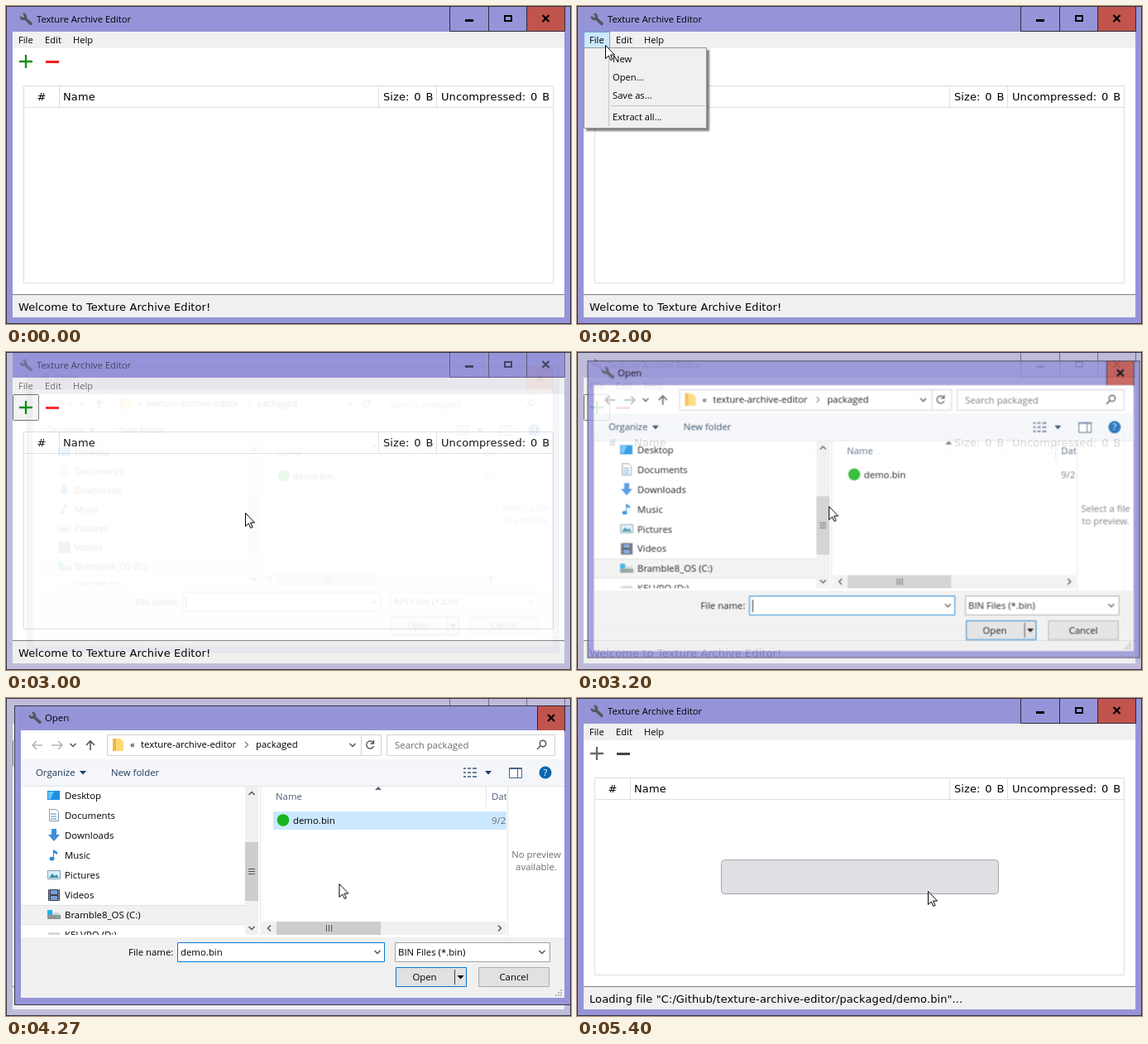
An HTML page that plays this animation: 683x384 px, repeating every 8000 ms.

```html
<!DOCTYPE html>
<html lang="en">
<head>
<meta charset="utf-8">
<title>Texture Archive Editor</title>
<style>
html, body { margin: 0; width: 100%; height: 100%; overflow: hidden; background: #fff; }
svg.stage { display: block; width: 100%; height: 100%; }
text { font: 11.2px "Open Sans", "Noto Sans", sans-serif; white-space: pre; }
.wide text { font: 13px "DejaVu Sans", sans-serif; letter-spacing: .1px; }
.head { word-spacing: 1.5px; }
.dialog text { font-size: 11.4px; }
.mid { text-anchor: middle; }
.line { fill: none; stroke-width: 1; }
.muted { fill: #6d6d6d; }

/* hard state changes share one clock; the keyframe name picks the state */
.state { animation: 8s step-end infinite; }
.border { animation-name: border; }
.titlebar { animation: titlebar 8s linear infinite; }
.red { animation-name: red; }
.dim { animation-name: dim; }
.hot-file { animation-name: hotFile; }
.menu { animation-name: menu; }
.hot-open { animation-name: hotOpen; }
.focus { animation-name: focus; }
.idle { animation-name: idle; }
.loading { animation-name: loading; }
.unpicked { animation-name: unpicked; }
.picked { animation-name: picked; }
.row { animation-name: row; }
.marked { animation-name: marked; }
.name-text { animation-name: nameText; }
.open-button { animation-name: openButton; }
.dialog-title { animation-name: dialogTitle; }
.dialog-close { animation-name: dialogClose; }
.dialog { transform-origin: 346px 189px; animation: dialog 8s linear infinite; }
.pointer { animation-name: pointer; }
.path { animation: path 8s ease-in-out infinite; }

@keyframes border { 0% { fill: #9694d8 } 33.375% { fill: #bfbcda } 59.125%, 100% { fill: #9694d8 } }
@keyframes titlebar {
  0%, 37.5% { fill: #9694d8 } 39.5%, 59.1% { fill: #bfbcda } 59.125%, 100% { fill: #9694d8 }
}
@keyframes red { 0% { opacity: 1 } 33.375% { opacity: 0 } 60%, 100% { opacity: 1 } }
@keyframes dim { 0% { opacity: 1 } 33.375% { opacity: .55 } 59.125%, 100% { opacity: 1 } }
@keyframes hotFile {
  0% { opacity: 0; fill: #e5f3ff } 21.6% { opacity: 1; fill: #e5f3ff }
  23.375% { opacity: 1; fill: #cce8ff } 30.875%, 100% { opacity: 0 }
}
@keyframes menu { 0% { opacity: 0 } 23.375% { opacity: 1 } 30.875%, 100% { opacity: 0 } }
@keyframes hotOpen { 0% { opacity: 0 } 27.4% { opacity: 1 } 30.875%, 100% { opacity: 0 } }
@keyframes focus { 0% { opacity: 0 } 30.875% { opacity: 1 } 59.125%, 100% { opacity: 0 } }
@keyframes idle { 0% { opacity: 1 } 62%, 100% { opacity: 0 } }
@keyframes loading { 0% { opacity: 0 } 62%, 100% { opacity: 1 } }
@keyframes unpicked { 0% { opacity: 1 } 49.2%, 100% { opacity: 0 } }
@keyframes picked { 0% { opacity: 0 } 49.2%, 100% { opacity: 1 } }
@keyframes row {
  0% { fill: #fff } 46.5% { fill: #e5f3ff } 49.2% { fill: #cce8ff } 58.375%, 100% { fill: #e6e6e6 }
}
@keyframes marked { 0% { opacity: 0 } 58.375%, 100% { opacity: 1 } }
@keyframes nameText { 0% { opacity: 0 } 49.2% { opacity: 1; fill: #000 } 58.375%, 100% { opacity: 1; fill: #fff } }
@keyframes openButton { 0% { fill: #e1e1e1 } 56.6% { fill: #e5f1fb } 58.375%, 100% { fill: #bfe0f8 } }
@keyframes dialogTitle { 0% { fill: #9694d8 } 59.125%, 100% { fill: #bfbcda } }
@keyframes dialogClose { 0% { fill: #c1544c } 59.125%, 100% { fill: #bfbcda } }
@keyframes dialog {
  0%, 37.49% { opacity: 0; transform: scale(.95) }
  37.5% { opacity: .09; transform: scale(.956) }
  40.5%, 59.1% { opacity: 1; transform: none }
  59.125% { opacity: .68; transform: scale(.989) }
  62%, 100% { opacity: 0; transform: scale(.95) }
}
@keyframes pointer { 0% { opacity: 0 } 12.5%, 100% { opacity: 1 } }
@keyframes path {
  0%, 12.5% { transform: translate(172px, 234px) }
  22.5%, 25% { transform: translate(34px, 47px) }
  29.125%, 30.875% { transform: translate(62px, 88px) }
  34.125%, 37.5% { transform: translate(289px, 194px) }
  45% { transform: translate(354px, 160px) }
  47.5%, 49.8% { transform: translate(345px, 150px) }
  58%, 59.2% { transform: translate(491px, 338px) }
  65%, 67.49% { transform: translate(423px, 233px) }
  67.5%, 100% { transform: translate(424px, 233px) }
}
</style>
</head>
<body>
<svg class="stage" viewBox="0 0 683 384" xmlns="http://www.w3.org/2000/svg">
<defs>
  <g id="wrench" fill="none" stroke="#55555c">
    <path d="M1.9 4.6A3 3 0 1 0 4.8 1.9" stroke-width="2.6"/>
    <path d="M6.5 6.5 14 13.3" stroke-width="3.6" stroke-linecap="round"/>
  </g>
  <path id="cross" d="M-4-4 4 4M4-4-4 4" fill="none" stroke="#000" stroke-width="2.2"/>
  <path id="down" d="M-3.5-2 0 1.5 3.5-2" fill="none" stroke="#555" stroke-width="1.5"/>
  <path id="drop" d="M-4-2H4L0 2.5Z"/>
  <path id="grip" d="M-4-3.5H4M-4-.5H4M-4 2.5H4" fill="none" stroke="#555"/>
  <g id="drive">
    <path d="M0 8h16v5H0Z" fill="#8d9298"/><path d="M0 8 2 5H14L16 8Z" fill="#d4d7da"/>
    <path d="M11 10.5h3" stroke="#5be05b" stroke-width="1.5"/>
  </g>
  <filter id="shadow" x="-10%" y="-10%" width="125%" height="125%">
    <feDropShadow dx="3" dy="3" stdDeviation="1.2" flood-opacity=".5"/>
  </filter>
  <clipPath id="tree"><path d="M18 107H289V286H18Z"/></clipPath>
  <clipPath id="list"><path d="M309 107H605V270H309Z"/></clipPath>
</defs>

<!-- main window -->
<rect class="state border" x=".5" y=".5" width="682" height="383" stroke="#32313f"/>
<rect class="titlebar" x="8" y="1" width="667" height="30"/>
<rect class="state red" x="629" y="1" width="46" height="30" fill="#c1544c"/>
<g class="state dim">
  <use href="#wrench" x="16" y="8"/>
  <text x="37" y="20">Texture Archive Editor</text>
  <path class="line" d="M536.5 0V30.5H675.5V0M583.5 0V30M629.5 0V30" stroke="#2c2b38"/>
  <path d="M555 16h10v3H555Z"/>
  <rect x="603" y="12" width="8" height="6" fill="none" stroke="#000" stroke-width="2"/>
  <use href="#cross" x="652.5" y="15"/>
</g>
<path d="M8 31H675V376H8Z" fill="#fff"/>
<path d="M8 31H675V51H8ZM8 349H675V376H8Z" fill="#f0f0f0"/>
<path class="line" d="M8 348.5H675" stroke="#7f7f7f"/>
<rect class="state hot-file" x="8.5" y="31.5" width="31" height="19" stroke="#6fa5cf"/>
<g class="state dim">
  <text x="15" y="45">File</text><text x="47" y="45">Edit</text><text x="81" y="45">Help</text>
</g>

<rect class="state focus" x="8.5" y="51.5" width="31" height="31" rx="1" fill="#f4f4f4" stroke="#707070"/>
<g class="state idle" fill="none">
  <path d="M16 67H32M24 59V75" stroke="#148c14" stroke-width="2.3"/>
  <path d="M48 67.5H64" stroke="#f01c1c" stroke-width="3"/>
</g>
<g class="state loading" fill="none">
  <path d="M16 67H32M24 59V75" stroke="#696969" stroke-width="2.3"/>
  <path d="M48 67.5H64" stroke="#444" stroke-width="3"/>
</g>

<path class="line" d="M21.5 96.5H661.5V334.5H21.5ZM21.5 122.5H661.5M64.5 97V122M450.5 97V122M520.5 97V122" stroke="#dedede"/>
<g class="wide">
  <g class="head">
    <text class="mid" x="43" y="114">#</text><text x="69" y="114">Name</text>
    <text x="456" y="114">Size: 0 B</text><text x="526" y="114">Uncompressed: 0 B</text>
  </g>
  <text class="state idle" x="15" y="368">Welcome to Texture Archive Editor!</text>
  <text class="state loading" x="15" y="368">Loading file "C:/Github/texture-archive-editor/packaged/demo.bin"...</text>
</g>
<rect class="state loading" x="174.5" y="195.5" width="335" height="41" rx="4" fill="#dfe0e4" stroke="#a6a8ac"/>

<!-- file menu -->
<g class="state menu">
  <rect x="8.5" y="50.5" width="148" height="97" fill="#f0f0f0" stroke="#999" filter="url(#shadow)"/>
  <path class="state hot-open" d="M11 75H154V97H11Z" fill="#91c9f7"/>
  <path class="line" d="M38.5 53V145M40 120.5H155" stroke="#c6c6c6"/>
  <text x="43" y="68">New</text><text x="43" y="90">Open...</text>
  <text x="43" y="112">Save as...</text><text x="43" y="138">Extract all...</text>
</g>

<!-- open dialog -->
<g class="dialog">
  <rect class="state dialog-title" x="10.5" y="9.5" width="672" height="361" stroke="#3a3948"/>
  <use href="#wrench" x="27" y="16"/>
  <text x="47" y="28">Open</text>
  <rect class="state dialog-close" x="642.5" y="9.5" width="33" height="30" stroke="#2c2b38"/>
  <use href="#cross" x="659" y="24"/>
  <path d="M18 39H675V362H18Z" fill="#fff"/>

  <g fill="none" stroke="#b5b5b5" stroke-width="1.6">
    <path d="M44 57H32M37 52 32 57 37 62M55 57H68M63 52 68 57 63 62"/>
    <path d="M102 63V52M97 57 102 52 107 57" stroke="#555"/>
    <path class="line" d="M122.5 44.5H453.5V69.5H122.5ZM429.5 45V69M460.5 44.5H663.5V69.5H460.5Z" stroke="#d2d2d2"/>
  </g>
  <use href="#down" x="81" y="57"/>
  <path d="M129 49h9l4 4v11H129Z" fill="#ffd873"/><path d="M129 49h4v15h-4Z" fill="#f1b944"/>
  <text x="150" y="60">«</text><text x="163" y="60">texture-archive-editor</text>
  <path class="line" d="M289 53 292.500 56.500 289 60" stroke="#333"/>
  <text x="302" y="60">packaged</text>
  <use href="#down" x="419" y="57"/>
  <path d="M444 54A4.500 4.500 0 1 0 444.500 58M444.500 51V55H440.500" fill="none" stroke="#555" stroke-width="1.4"/>
  <text class="muted" x="470" y="61">Search packaged</text>
  <g fill="none" stroke="#555" stroke-width="1.5"><circle cx="649" cy="55" r="3.7"/><path d="M646 58 642 62"/></g>

  <path d="M18 74H675V106H18Z" fill="#f5f6f9"/>
  <path class="line" d="M18 106.500H675" stroke="#e3e5ea"/>
  <g fill="#1e395b">
    <text x="36" y="94">Organize</text><text x="127" y="94">New folder</text>
    <use href="#drop" x="93" y="90"/><use href="#drop" x="583" y="90"/>
  </g>
  <path d="M553 85h3m2 0h4m2 0h5M553 90h3m2 0h4m2 0h5M553 95h3m2 0h4m2 0h5" stroke="#6b7f98" stroke-width="2"/>
  <path d="M608.500 84.500H623.500V96.500H608.500ZM618.500 85V96M608 85.500H624" fill="#fff" stroke="#48658b"/>
  <circle cx="652" cy="90" r="7.500" fill="#0b66b4"/>
  <text class="mid" x="652" y="94" fill="#fff" font-weight="700">?</text>

  <g clip-path="url(#tree)">
    <path d="M18 250H289V273H18Z" fill="#f1f1f1"/>
    <path class="line" d="M18 250.500H289M18 273.500H289" stroke="#e2e2e2"/>
    <text x="71" y="122">Desktop</text><text x="71" y="146">Documents</text>
    <text x="71" y="170">Downloads</text><text x="71" y="194">Music</text>
    <text x="71" y="218">Pictures</text><text x="71" y="242">Videos</text>
    <text x="71" y="266">Bramble8_OS (C:)</text><text x="71" y="290">KELVRO (D:)</text>
    <path d="M50 112h15v11H50Z" fill="#1c8fe0"/><path d="M51 113h7l-4 9h-3Z" fill="#6dc1f5"/>
    <path d="M52.500 134.500h8l3 3v11h-11Z" fill="#fff" stroke="#8a9aa8"/>
    <path d="M54 140h7M54 143h7M54 146h7" stroke="#3d8ac7"/>
    <path d="M55 158h6v7h4l-7 8-7-8h4Z" fill="#3e8ddc"/>
    <path d="M57 194V183l5 3v3l-4-2v7" fill="#2089e2"/><ellipse cx="55.500" cy="194" rx="3" ry="2.300" fill="#2089e2"/>
    <path d="M50.500 208.500h15v10h-15Z" fill="#d7effb" stroke="#8aa0ad"/><path d="M52 217l4-5 3 3 2-2 3 4Z" fill="#3e8ba4"/>
    <path d="M51 231h14v14H51Z" fill="#3b3f4c"/><path d="M54 232h8v5h-8Zm0 7h8v5h-8Z" fill="#769fd8"/>
    <path d="M52.500 231v14M63.500 231v14" stroke="#ddd" stroke-dasharray="1.500"/>
    <use href="#drive" x="50" y="254"/><path d="M50 256h6v6h-6Z" fill="#1eb0e8"/>
    <use href="#drive" x="50" y="278"/>
  </g>
  <path d="M289 107H305V286H289ZM309 270H605V286H309Z" fill="#f0f0f0"/>
  <path d="M289 174H305V245H289ZM327 270H453V286H327Z" fill="#cdcdcd"/>
  <use href="#grip" x="297" y="210"/>
  <use href="#grip" transform="translate(390 278) rotate(90)"/>
  <use href="#down" transform="translate(297 115) scale(1 -1)"/><use href="#down" x="297" y="278"/>
  <use href="#down" transform="translate(318 278) rotate(90)"/><use href="#down" transform="translate(597 278) rotate(-90)"/>
  <path class="line" d="M307.500 107V289M580.500 107V131M606.500 107V289" stroke="#e5e5e5"/>

  <g clip-path="url(#list)">
    <path class="state row" d="M323 137H605V159H323Z"/>
    <path d="M446 111h8l-4-4Z" fill="#5b6775"/>
    <g fill="#4c5f78"><text x="326" y="123">Name</text><text x="587" y="123">Date</text></g>
    <circle cx="335" cy="147.500" r="7.300" fill="#17b51c"/>
    <text x="347" y="152">demo.bin</text><text class="muted" x="587" y="152">9/2</text>
  </g>
  <g class="mid muted">
    <g class="state unpicked"><text x="641" y="193">Select a file</text><text x="641" y="208">to preview.</text></g>
    <g class="state picked"><text x="641" y="193">No preview</text><text x="641" y="208">available.</text></g>
  </g>

  <path d="M18 289H675V362H18Z" fill="#f0f0f0"/>
  <text x="148" y="311">File name:</text>
  <path d="M207.500 295.500H457.500V318.500H207.500Z" fill="#fff" stroke="#0878cf"/>
  <path d="M470.500 295.500H657.500V318.500H470.500Z" fill="#fff" stroke="#a4a4a4"/>
  <path class="state unpicked" d="M211.500 300V315" stroke="#000"/>
  <path class="state marked" d="M210 299H264V315H210Z" fill="#0878d7"/>
  <text class="state name-text" x="211" y="311">demo.bin</text>
  <text x="474" y="311">BIN Files (*.bin)</text>
  <use href="#down" x="449" y="307"/><use href="#down" x="648" y="307"/>
  <path class="state open-button" d="M471.500 325.500H556.500V348.500H471.500Z" stroke="#0878cf"/>
  <path class="line" d="M542.500 328V346" stroke="#444"/>
  <use href="#drop" x="549.500" y="337"/>
  <path d="M571.500 325.500H656.500V348.500H571.500Z" fill="#e1e1e1" stroke="#adadad"/>
  <g class="mid"><text x="506" y="341">Open</text><text x="614" y="341">Cancel</text></g>
  <path d="M664 359h2m1 0h2m1 0h2M667 356h2m1 0h2M670 353h2" stroke="#bbb" stroke-width="2"/>
</g>

<g class="state pointer"><g class="path">
  <path d="M.5.5V16.500L4.300 13 6.800 18.500 9 17.500 6.600 12H11.500Z" fill="#fff" stroke="#000"/>
</g></g>
</svg>
</body>
</html>
```
